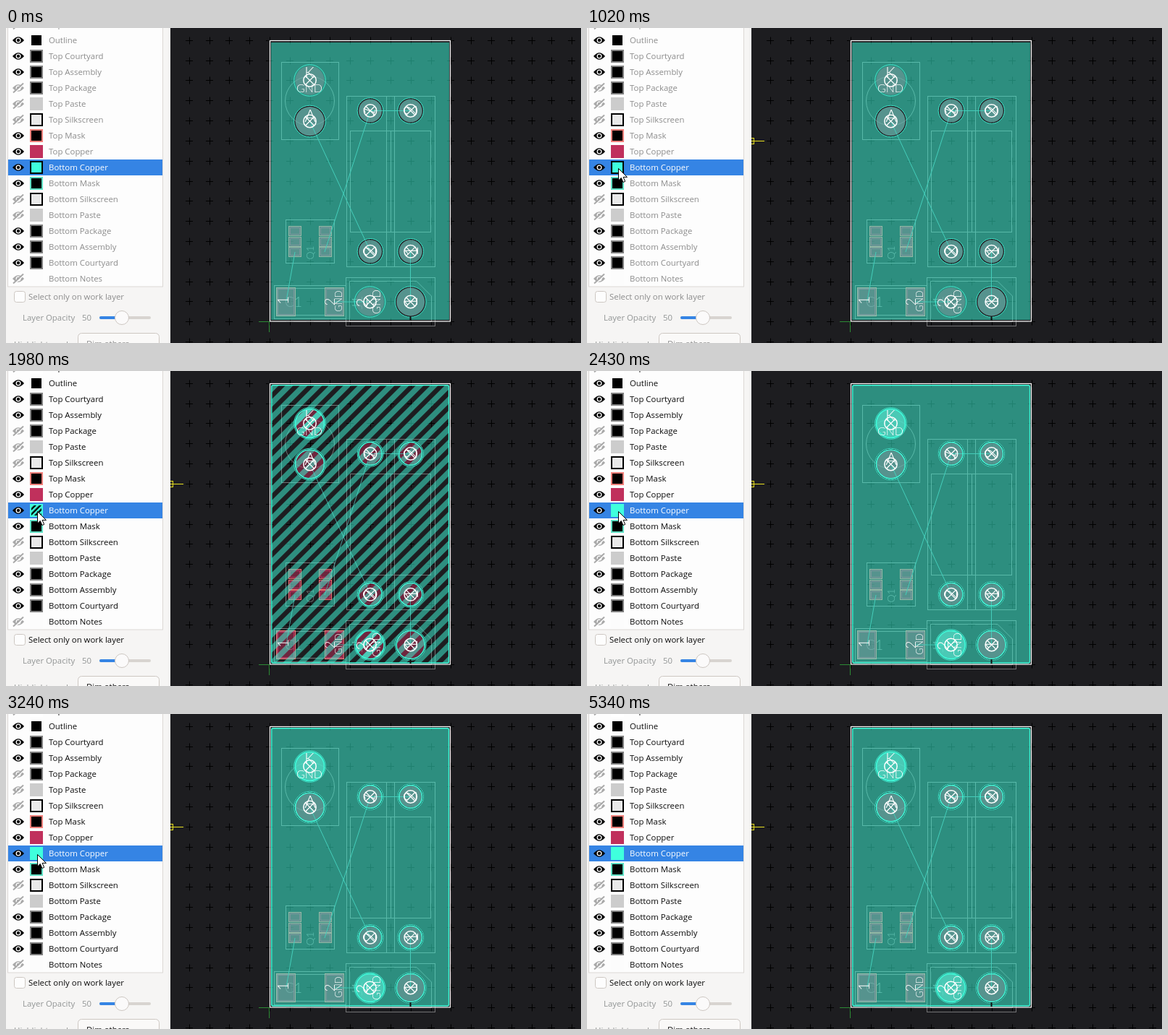
An HTML page for the animation above (5940 ms loop, 794x436 px).

```html
<!DOCTYPE html>
<html lang="en">
<head>
<meta charset="utf-8">
<title>Layer display modes</title>
<style>
  html, body { margin: 0; width: 100%; height: 100%; overflow: hidden; background: #1d1d20; }
  svg { display: block; width: 794px; height: 436px; }
  .ui { font: 11.4px "Open Sans", "Noto Sans", sans-serif; }
  .pcb { font-family: Lato, "Open Sans", sans-serif; font-weight: 300; text-anchor: middle; }
</style>
</head>
<body>
<svg id="stage" viewBox="0 0 794 436">
  <defs>
    <pattern id="hatch" width="14.142" height="14.142" patternUnits="userSpaceOnUse" patternTransform="translate(366 20) rotate(45)">
      <rect width="7.6" height="14.142" fill="#3fffdd"/>
    </pattern>
    <pattern id="mini" width="5" height="5" patternUnits="userSpaceOnUse" patternTransform="translate(35 186) rotate(45)">
      <rect width="2.6" height="5" fill="#3fffdd"/>
    </pattern>
  </defs>
  <g id="board"></g>
  <g id="panel" class="ui"></g>
  <path id="pointer" d="M0 0V16.5L3.8 12.9L6.4 19L9.2 17.8L6.6 11.9H12Z" fill="#fff" stroke="#000" stroke-width="1" stroke-linejoin="round"/>
</svg>
<script>
const LOOP = 5940;
const CYAN = '#3fffdd', GREY = '#727274', RED = '#c0305c', MASK = '#f47070';
const STEP = 27.82, OX = 364, OY = 406.3;
const NS = 'http://www.w3.org/2000/svg';
const board = document.getElementById('board');
const panel = document.getElementById('panel');
const pointer = document.getElementById('pointer');

function add(parent, tag, attrs, text) {
  const el = document.createElementNS(NS, tag);
  set(el, attrs);
  if (text) el.textContent = text;
  parent.appendChild(el);
  return el;
}
function set(el, attrs) {
  for (const k in attrs) el.setAttribute(k, attrs[k]);
}
function box(parent, x1, y1, x2, y2, attrs) {
  return add(parent, 'rect', { x: x1, y: y1, width: x2 - x1, height: y2 - y1, fill: 'none', ...attrs });
}
function disc(parent, cx, cy, r, attrs) {
  return add(parent, 'circle', { cx, cy, r, fill: 'none', ...attrs });
}
function line(parent, d, stroke, width = 1) {
  return add(parent, 'path', { d, fill: 'none', stroke, 'stroke-width': width });
}
function label(x, y, size, text, turn = 0, fill = '#fff') {
  add(board, 'text', {
    class: 'pcb', 'font-size': size, fill, y: size * 0.36,
    transform: `translate(${x} ${y}) rotate(${turn})`
  }, text);
}

// ---- board ----
const pads = [
  { x: 419.5, y: 72.5, r: 20, gnd: true },
  { x: 419.5, y: 129, r: 20 },
  { x: 503, y: 114.5, r: 16 },
  { x: 558.7, y: 114.5, r: 16 },
  { x: 503, y: 309.3, r: 16 },
  { x: 558.7, y: 309.3, r: 16 },
  { x: 502.5, y: 379, r: 19.5, gnd: true },
  { x: 558.7, y: 379, r: 19.5 }
];

let grid = '';
for (let i = -4; i <= 15; i++)
  for (let j = -1; j <= 14; j++)
    grid += `M${Math.round(OX + i * STEP) - 5} ${Math.round(OY - j * STEP) + .5}h10m-4.5-5v10`;
line(board, grid, '#000');
line(board, `M349 406.5H364M363.5 406V421`, '#2c8a34');

// courtyards and bodies
const outlines = [
  [380, 47, 459, 154], [470, 94, 536, 330], [525, 94, 592, 330],
  [475, 142, 531, 282], [531, 142, 586, 282], [386, 265, 453, 325],
  [370, 356, 469, 402], [374, 360, 466, 397], [469, 345, 592, 412]
];
for (const [a, b, c, d] of outlines)
  box(board, a + .5, b + .5, c + .5, d + .5, { stroke: GREY });
disc(board, 419.5, 101, 34, { stroke: GREY });
line(board, 'M474.5 350.5H567L587.5 371V406.5H474.5Z', GREY);
label(420, 311, 14, 'Q1', -90, '#858587');
label(397, 379, 19, 'C1', 0, '#858587');
label(485, 380, 19, 'J1', -90, '#858587');

// surface pads
function smd(x1, y1, x2, y2) {
  box(board, x1 + .5, y1 + .5, x2 + .5, y2 + .5, { fill: RED, 'fill-opacity': .5, stroke: MASK });
  box(board, x1 + 2.5, y1 + 2.5, x2 - 1.5, y2 - 1.5, { stroke: RED });
}
for (const x of [390, 432])
  for (const y of [274, 289, 303]) smd(x, y, x + 17, y + 13);
smd(373, 359, 399, 398);
smd(440, 359, 466, 398);

for (const p of pads) disc(board, p.x, p.y, p.r, { fill: RED, 'fill-opacity': .5 });
line(board, 'M419.5 129L503 309M503 114.5L440 310M503 114.5H559M399 310L387 378M558.5 309V379M453 379H502', '#4a9c98');

// copper pour with clearance around foreign pads
const ring = (x, y, r) => `M${x - r} ${y}a${r} ${r} 0 1 0 ${2 * r} 0a${r} ${r} 0 1 0 ${-2 * r} 0Z`;
const pour = add(board, 'path', {
  d: 'M366 20H612V404H366Z' + pads.filter(p => !p.gnd).map(p => ring(p.x, p.y, p.r + 1.8)).join(''),
  'fill-rule': 'evenodd', 'fill-opacity': .5
});
const copper = pads.map(p => disc(board, p.x, p.y, p.r, { 'fill-opacity': .5 }));
const edges = add(board, 'g', {});
box(edges, 366.7, 19.7, 611.5, 404, { stroke: CYAN, 'stroke-width': 1.4, rx: 2 });
for (const p of pads) disc(edges, p.x, p.y, p.r, { stroke: CYAN, 'stroke-width': 1.5 });
for (const p of pads) {
  disc(board, p.x, p.y, p.r + 1.8, { stroke: '#3fe8cd' });
  disc(board, p.x, p.y, 8.7, { stroke: '#fff', 'stroke-width': 1.5 });
  line(board, `M${p.x - 6} ${p.y - 6}l12 12m0-12l-12 12`, '#fff', 1.2);
}
line(board, 'M558.5 399V406', '#111', 2);
box(board, 364.5, 17.5, 613.5, 406, { stroke: '#fff', 'stroke-width': 1.2 });

label(419, 61, 21, 'K');
label(419, 83, 16, 'GND');
label(420, 121, 24, 'A');
label(501, 115, 23, '1', -70);
label(558, 114, 25, '2', -90);
label(502, 309, 25, '2', -90);
label(560, 309, 25, '1', -90);
label(382, 377, 21, '1', -90);
label(447, 379, 19, '2', -90);
label(459, 378, 13, 'GND', -90);
label(491, 380, 22, '2', -90);
label(512, 379, 15, 'GND', -90);
label(559, 379, 25, '1', -90);

const cross = add(board, 'g', {});
line(cross, 'M-20 .5H20M.5-20V20', '#e8e020');
box(cross, -4.5, -3.5, 5.5, 4.5, { stroke: '#e8e020' });

// ---- layer panel ----
// style: o = outline, f = fill, b = fill inside a black border
const DIM = '#808080';
const rows = [
  ['Top Notes', 0, '#fff', 'f'], ['Outline', 1, '#fff', 'o'],
  ['Top Courtyard', 1, DIM, 'o'], ['Top Assembly', 1, DIM, 'o'],
  ['Top Package', 0, DIM, 'o'], ['Top Paste', 0, '#ccc', 'f'],
  ['Top Silkscreen', 0, '#e9e9e9', 'b'], ['Top Mask', 1, '#f47f7a', 'o'],
  ['Top Copper', 1, RED, 'f'], ['Bottom Copper', 1, CYAN, 'b'],
  ['Bottom Mask', 1, '#5fe0c4', 'o'], ['Bottom Silkscreen', 0, '#e9e9e9', 'b'],
  ['Bottom Paste', 0, '#ccc', 'f'], ['Bottom Package', 1, DIM, 'o'],
  ['Bottom Assembly', 1, DIM, 'o'], ['Bottom Courtyard', 1, DIM, 'o'],
  ['Bottom Notes', 0, '#fcfcfc', 'f']
];
const faded = [];
const write = (x, y, text, fill) => add(panel, 'text', { x, y, fill }, text);

function eye(y, on, back) {
  const g = add(panel, 'g', { transform: `translate(17 ${y})` });
  const ink = on ? '#000' : '#a9a9a9';
  add(g, 'path', { d: 'M-8 0Q0-9.6 8 0Q0 9.6-8 0Z', fill: ink });
  disc(g, 0, 0, 3.5, { fill: back });
  disc(g, 0, 0, 2.2, { fill: ink });
  if (!on) {
    line(g, 'M-6 7.5L8-5', '#fff', 1.5);
    line(g, 'M-7 6.5L7-6.5', ink, 2);
  }
}
function swatch(y, color, style) {
  const rim = box(panel, 33, y - 9, 51, y + 9, { fill: style === 'b' ? '#000' : color });
  const core = box(panel, 35, y - 7, 49, y + 7, { fill: style === 'o' ? '#000' : color });
  return { rim, core };
}

box(panel, 0, 0, 227, 436, { fill: '#f6f5f4' });
box(panel, 2.5, -2, 216.5, 358, { fill: '#fdfdfd', stroke: '#dcd8d5' });
let active;
rows.forEach(([name, on, color, style], i) => {
  const y = 22 * i - 5, chosen = name === 'Bottom Copper';
  if (chosen) box(panel, 3, y - 11, 216, y + 11, { fill: '#3584e4' });
  eye(y, on, '#fff');
  const s = swatch(y, color, style);
  if (chosen) active = s;
  const text = write(59, y + 4, name, '#fff');
  if (!chosen) faded.push(text);
});

box(panel, 11.5, 364.5, 26.5, 379.5, { rx: 3, fill: '#fdfdfd', stroke: '#cdc7c2' });
faded.push(write(31, 376, 'Select only on work layer'));
write(23, 405, 'Layer Opacity', '#929595');
write(105, 405, '50', '#929595');
box(panel, 129, 399, 200, 403, { rx: 2, fill: '#d8d4d0' });
box(panel, 129, 399, 160, 403, { rx: 2, fill: '#3584e4' });
disc(panel, 160, 401, 9.5, { fill: '#fbfafa', stroke: '#cdc7c2' });
write(11, 442, 'Highlight mode', '#929595');
box(panel, 99.5, 422.5, 211.5, 450, { rx: 5, fill: '#faf9f8', stroke: '#cdc7c2' });
faded.push(write(111, 441, 'Dim others'));

// ---- timeline ----
const modes = [
  [0, 'solid'], [1380, 'outline'], [1980, 'hatch'], [2430, 'fill'], [2790, 'outline'],
  [3240, 'fill'], [3690, 'solid'], [4170, 'hatch'], [4680, 'fill']
];
const clamp = v => Math.max(0, Math.min(1, v));
const part = (t, a, b) => clamp((t - a) / (b - a));
const mix = (a, b, k) => a + (b - a) * k;
const ease = k => k * k * (3 - 2 * k);

function showMode(mode) {
  const paint = { solid: CYAN, fill: CYAN, hatch: 'url(#hatch)', outline: 'none' }[mode];
  set(pour, { fill: paint });
  pads.forEach((p, i) => set(copper[i], { fill: p.gnd && mode === 'solid' ? 'none' : paint }));
  set(edges, { visibility: mode === 'solid' ? 'hidden' : 'visible' });
  set(active.rim, { fill: mode === 'solid' ? '#000' : CYAN });
  set(active.core, { fill: mode === 'outline' ? '#000' : CYAN });
  set(stripes, { visibility: mode === 'hatch' ? 'visible' : 'hidden' });
}
const stripes = add(panel, 'g', {});
box(stripes, 35, 186, 49, 200, { fill: '#000' });
box(stripes, 35, 186, 49, 200, { fill: 'url(#mini)' });

function pointerAt(t) {
  if (t < 870) {
    const k = ease(part(t, 240, 790));
    return [mix(788, 51, k), mix(49, 199, k)];
  }
  if (t < 5190) {
    const k = part(t, 860, 1020);
    return [mix(51, 43.5, k), mix(199, 194.5, k)];
  }
  const k = ease(part(t, 5190, 5320));
  return [mix(43.5, 674, k), mix(194.5, 88, k)];
}

function draw(t) {
  showMode(modes.filter(m => m[0] <= t).pop()[1]);

  const [x, y] = pointerAt(t);
  set(pointer, {
    transform: `translate(${x.toFixed(1)} ${y.toFixed(1)})`,
    visibility: t >= 270 && t < 5340 ? 'visible' : 'hidden'
  });

  const inside = t < 870 && x > 227;
  const cx = inside ? Math.round((x - OX) / STEP) : -5;
  const cy = inside ? Math.round((OY - y) / STEP) : 9;
  set(cross, {
    transform: `translate(${Math.round(OX + cx * STEP)} ${Math.round(OY - cy * STEP)})`,
    visibility: t >= 270 ? 'visible' : 'hidden'
  });

  const v = Math.round(mix(140, 12, part(t, 1350, 1500)));
  for (const el of faded) set(el, { fill: `rgb(${v},${v},${v})` });
}

function tick() {
  draw(performance.now() % LOOP);
  requestAnimationFrame(tick);
}
tick();
</script>
</body>
</html>
```
